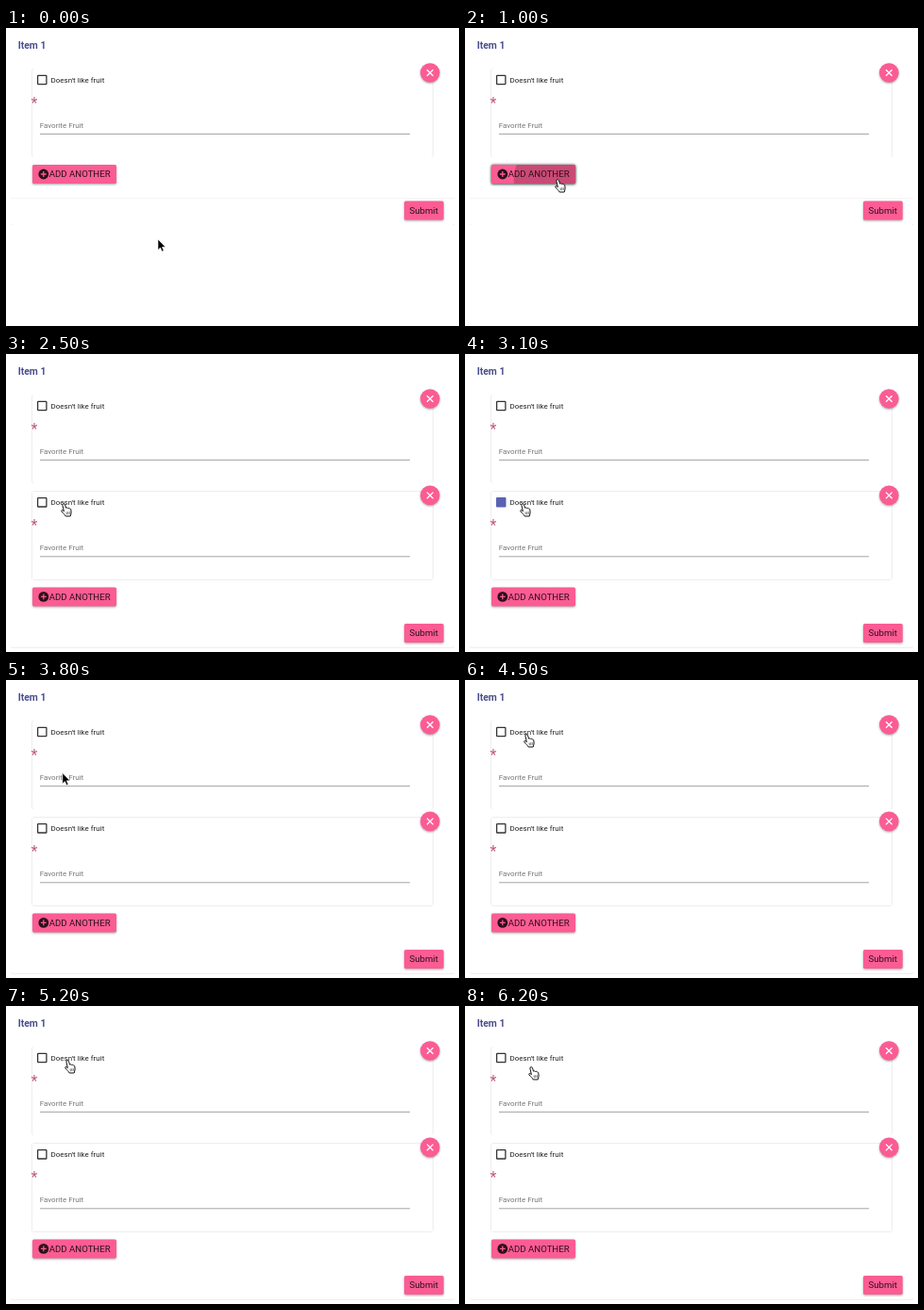
These frames come from a looping animation (480x316 px, 6.3 s). An HTML page:

```html
<!DOCTYPE html>
<html lang="en">
<head>
<meta charset="utf-8">
<title>Repeating form</title>
<style>
  html, body { margin: 0; width: 100%; height: 100%; overflow: hidden; background: #fff; }
  svg { display: block; width: 480px; height: 316px; }
  text { font: 8px Roboto, sans-serif; fill: #222; }
  .title { font-size: 10.4px; font-weight: 700; fill: #4b4f8d; }
  .hint { fill: #777; }
  .star { font-size: 16px; fill: #c05a7d; }
  .caption { font-size: 9.65px; fill: #2b1119; }
  .card { fill: #fff; filter: drop-shadow(0 .7px .7px rgba(0, 0, 0, .27)); }
  .pink { fill: #fb5c93; filter: drop-shadow(0 1px .8px rgba(0, 0, 0, .35)); }
  .focus { filter: drop-shadow(0 0 1.5px rgba(0, 0, 0, .65)); }
  .line { fill: none; stroke-width: 1.3; }
</style>
</head>
<body>
<svg id="stage" viewBox="0 0 480 316"></svg>
<script>
const LOOP = 6300, STEP = 100;
const OPEN = 102.4, CLOSED = 32.5;

// [time, x, y] of the pointer's top left corner
const path = [
  [0, 161, 224], [700, 95, 160], [1400, 95, 160], [2100, 58, 158],
  [3400, 58, 158], [4100, 61, 60], [4200, 62, 57], [6100, 62, 57], [6200, 67, 64]
];
const presses = [900, 2400, 2900, 4400, 5000];
const items = [
  { from: 0, check: 4600, uncheck: 5100 },
  { from: 1100, check: 2600, uncheck: 3100 }
];

const clamp = v => Math.min(1, Math.max(0, v));
const ease = v => v * v * (3 - 2 * v);
const within = (t, a, b) => t >= a && t < b;
const group = (x, y, body) => `<g transform="translate(${x} ${y})">${body}</g>`;

function pointerAt(t) {
  const next = path.findIndex(p => p[0] > t);
  if (next < 0) return path[path.length - 1].slice(1);
  const [a, b] = [path[next - 1], path[next]];
  const k = ease((t - a[0]) / (b[0] - a[0]));
  return [1, 2].map(i => a[i] + (b[i] - a[i]) * k);
}

function checkbox(item, t) {
  if (!within(t, item.check, item.uncheck + STEP))
    return '<rect class="line" x="33.6" y="50.3" width="9.3" height="9.3" rx=".6" stroke="#333"/>';
  const drawn = t < item.uncheck ? clamp((t - item.check + STEP) / 200) : 0;
  return `<rect x="33" y="49.7" width="10.5" height="10.5" rx="1" fill="#5a62b4"/>
    <path class="line" d="M34.6 55l2.5 2.5 4.9-5" stroke="#fff" pathLength="1"
      stroke-dasharray="${drawn} 2" opacity="${drawn ? 1 : 0}"/>`;
}

function itemCard(item, t, y, open) {
  const field = `<text class="star" x="26.6" y="84.6">*</text>
    <text class="hint" x="35.7" y="106">Favorite Fruit</text>
    <path d="M36 112.4H428" stroke="#8c8c8c" stroke-width=".8"/>`;
  return group(0, y, `
    <rect class="card" x="27.5" y="43" width="425" height="${open ? 94 : 24}" rx="2"/>
    ${checkbox(item, t)}
    <text x="47.5" y="57.8">Doesn't like fruit</text>
    ${open ? field : ''}
    <circle class="pink" cx="449.3" cy="47.5" r="10.3"/>
    <path class="line" d="M446 44.2l6.6 6.6m0-6.6l-6.6 6.6" stroke="#fff"/>`);
}

function addButton(t) {
  const grow = 1 - (1 - clamp((t - 880) / 450)) ** 3.2;
  const fade = within(t, 900, 1500) ? 1 - clamp((t - 1100) / 400) : 0;
  const [, x, y] = path[1];
  return `<g class="${within(t, 800, 1500) ? 'focus' : ''}">
      <rect class="pink" x="28" y="145" width="89" height="20" rx="1.6"/></g>
    <g clip-path="url(#button)">
      <circle cx="${x + 2}" cy="${y + 1}" r="${72 * grow}" opacity="${.2 * fade}"/></g>
    <circle cx="39.8" cy="155" r="5.4" fill="#2b1119"/>
    <path class="line" d="M36.9 155h5.8m-2.9-2.9v5.8" stroke="#fb5c93"/>
    <text class="caption" x="45.7" y="158.4">ADD ANOTHER</text>`;
}

function pointer(t) {
  const [x, y] = pointerAt(t);
  const arrow = t < 600 || within(t, 3600, 4000);
  const ring = presses.includes(t)
    ? '<circle cx="0" cy="-2" r="25.6" fill="none" stroke="#222" stroke-width="1.1"/>' : '';
  const shape = arrow
    ? '<path d="M0 0V11.4L2.6 9 4.3 13 6.2 12.2 4.5 8.3H8Z" stroke="#fff" stroke-width=".6"/>'
    : `<path d="M1.9 2.2C1.7.4 4 .1 4.5 1.7L5.5 5.2C6.1 4.6 7.1 4.8 7.4 5.5 8 5 8.9 5.3 9.2 6
        10 5.7 10.7 6.2 10.8 7L11.1 10C11.2 11.7 10.4 12.4 10.2 14H5.2C4.6 12.4 2.2 10.7 1 9
        .2 7.8 1.3 7 2.3 7.8L3.4 8.8Z" fill="#fff" stroke="#111" stroke-width="1"/>
      <path d="M6 9.5l.4 2.7m1.2-2.9l.3 2.8m1.3-3l.2 2.7" stroke="#222" stroke-width=".6"/>`;
  return group(x, y, ring + shape);
}

function scene(t) {
  let y = 0, cards = '';
  for (const item of items.filter(i => t >= i.from)) {
    const open = !within(t, item.check, item.uncheck);
    cards += itemCard(item, t, y, open);
    y += open ? OPEN : CLOSED;
  }
  const shift = y - OPEN;
  return `<clipPath id="button"><rect x="28" y="145" width="89" height="20" rx="1.6"/></clipPath>
    <rect class="card" x="5" y="-4" width="470" height="${213 + shift}" rx="2"/>
    <text class="title" x="12.7" y="22">Item 1</text>
    ${t < 1100 ? '<path d="M5 180.5H475" stroke="#f4f4f4"/>' : ''}
    ${cards}
    ${group(0, shift, addButton(t) + `
      <rect class="pink" x="422" y="183.5" width="41.7" height="20" rx="1.6"/>
      <text class="caption" x="427.6" y="197">Submit</text>`)}
    ${pointer(t)}`;
}

const stage = document.getElementById('stage');
let shown = -1;
function tick() {
  const t = Math.floor(performance.now() % LOOP / STEP) * STEP;
  if (t !== shown) stage.innerHTML = scene(shown = t);
  requestAnimationFrame(tick);
}
tick();
</script>
</body>
</html>
```
